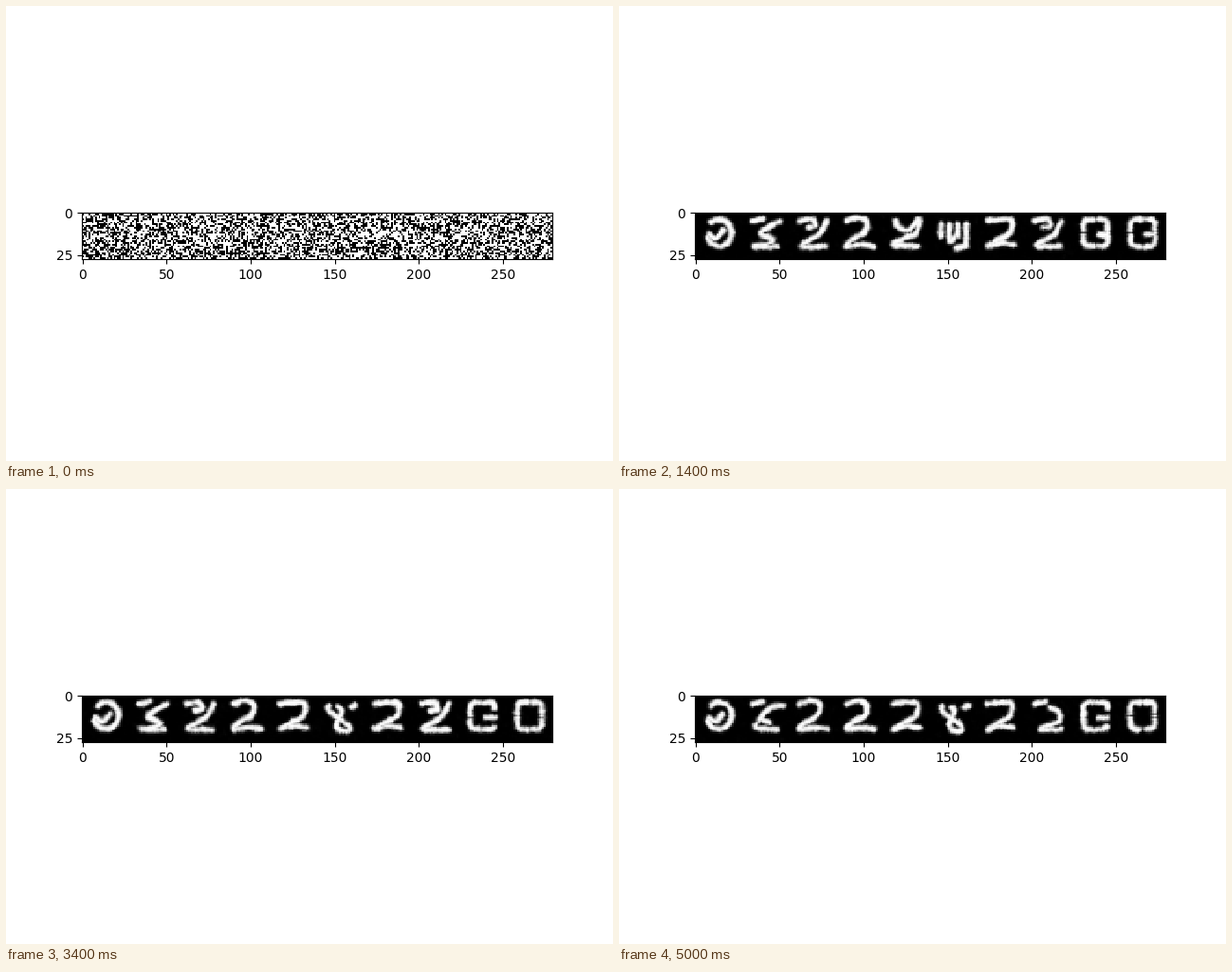
A matplotlib script for the animation above (5.05 s loop, 640 by 480 pixels).

```python
import numpy as np
import matplotlib.pyplot as plt
from matplotlib.animation import FuncAnimation

FRAMES, STEP = 101, 50
SIZE = 28
RADIUS, SHARP = 1.65, 2.6
KEY_TIMES = [800, 1400, 2150, 3400, 5000]

rng = np.random.default_rng(7)
rows, cols = np.mgrid[0:SIZE, 0:SIZE]


def curve(*points):
    """Catmull-Rom curve through (col, row) points."""
    p = np.array([points[0], *points, points[-1]], float)
    t = np.linspace(0, 1, 30)[:, None]
    parts = [0.5 * (2 * b + (c - a) * t + (2 * a - 5 * b + 4 * c - d) * t ** 2
                    + (3 * b - a - 3 * c + d) * t ** 3)
             for a, b, c, d in zip(p, p[1:], p[2:], p[3:])]
    return np.concatenate(parts)


def arc(start, stop, power=1.0):
    """Part of an oval, clockwise from the right; a low power squares it off."""
    a = np.radians(np.linspace(start, stop, 160))
    c, s = np.cos(a), np.sin(a)
    return np.column_stack([14 + 7.3 * np.sign(c) * np.abs(c) ** power,
                            12 + 8 * np.sign(s) * np.abs(s) ** power])


def figure_eight():
    """Slanted double loop with an open top."""
    t = np.linspace(0.35, 2 * np.pi - 0.5, 160)
    y = -7.5 * np.cos(t)
    return np.column_stack([12.5 - 3.7 * np.sin(2 * t) + 0.5 * y, 13.5 + y])


cap = curve((6, 5), (12, 3.5))
notch = curve((21, 13), (16, 13))
box = arc(0, 360, 0.4)
rising = curve((22, 5), (18, 12), (12, 16), (7, 20), (21, 20))

glyphs = {
    "gapped": [cap, arc(-60, 165), curve((14, 8), (13, 13), (9, 14))],
    "curled": [arc(-130, 160), curve((8, 13), (12, 15), (16, 11))],
    "cross": [cap, curve((22, 4), (14, 13), (7, 20)), curve((10, 9), (19, 16), (20, 20), (14, 20))],
    "sigma": [cap, curve((22, 5), (11, 12), (18, 16), (14, 19), (7, 20), (20, 20))],
    "hook": [cap, curve((24, 6), (17, 7), (11, 13), (8, 19), (20, 20)), curve((11, 14), (16, 16))],
    "fork": [curve((6, 5), (13, 4), (15, 8), (11, 9)), rising],
    "two": [curve((6, 5), (13, 3), (18, 6), (16, 12), (9, 16), (6, 20), (14, 19), (22, 20))],
    "wide": [curve((6, 5), (14, 4), (20, 5), (19, 12), (12, 16), (6, 20), (13, 18), (21, 19))],
    "bowl": [curve((7, 5), (9, 9), (15, 10), (21, 4), (19, 12), (12, 15), (6, 19), (20, 20))],
    "bars": [curve((x, 7), (x, y)) for x, y in zip((6, 11, 16, 21), (14, 17, 14, 20))]
            + [curve((12, 17), (16, 12)), curve((15, 21), (21, 20))],
    "eight": [figure_eight(), curve((20, 7), (22, 6))],
    "tail": [cap, curve((15, 7), (20, 10), (20, 15), (13, 18), (10, 20), (21, 20))],
    "box": [box],
    "notched": [box, notch],
    "arch": [arc(40, 345, 0.4), notch],
}

# What each cell shows at the key times.
chains = [
    "gapped curled gapped curled curled",
    "cross sigma sigma sigma hook",
    "fork fork fork fork two",
    "two two two two two",
    "box bowl wide wide wide",
    "bars bars eight eight eight",
    "wide wide wide wide wide",
    "cross fork fork fork tail",
    "notched notched notched arch arch",
    "notched notched notched box box",
]


def ink_odds(strokes):
    """Log-odds of ink for one cell, from the distance to its strokes."""
    path = np.concatenate(strokes)
    gaps = np.hypot(cols[..., None] - path[:, 0], rows[..., None] - path[:, 1])
    return np.clip(SHARP * (RADIUS - gaps.min(axis=-1)), -6, 4)


def soft_noise(shape):
    noise = rng.normal(size=shape)
    for axis in (0, 0, 1, 2):
        noise = noise + np.roll(noise, 1, axis) + np.roll(noise, -1, axis)
    return noise / noise.std()


odds = {name: ink_odds(strokes) for name, strokes in glyphs.items()}
poses = np.array([np.hstack(row) for row in
                  zip(*[[odds[name] for name in chain.split()] for chain in chains])])
start = (rng.random(poses[0].shape) < 0.55).astype(float)
wobble = soft_noise((FRAMES, *start.shape))


def picture(n):
    if n == 0:
        return start
    place = np.interp(n * STEP, KEY_TIMES, range(len(KEY_TIMES)))
    i = min(int(place), len(KEY_TIMES) - 2)
    blend = poses[i] + (poses[i + 1] - poses[i]) * (place - i)
    unrest = np.exp(-n / 4)
    blend = blend * (1 - 0.3 * unrest) + wobble[n] * (0.7 + 0.8 * unrest)
    return 1 / (1 + np.exp(-blend))


fig, ax = plt.subplots(figsize=(6.4, 4.8), dpi=100)
image = ax.imshow(start, cmap="gray", vmin=0, vmax=1, interpolation="nearest")


def update(n):
    image.set_data(picture(n))
    return [image]


anim = FuncAnimation(fig, update, frames=FRAMES, interval=STEP, repeat=True, repeat_delay=0)
plt.show()
```
